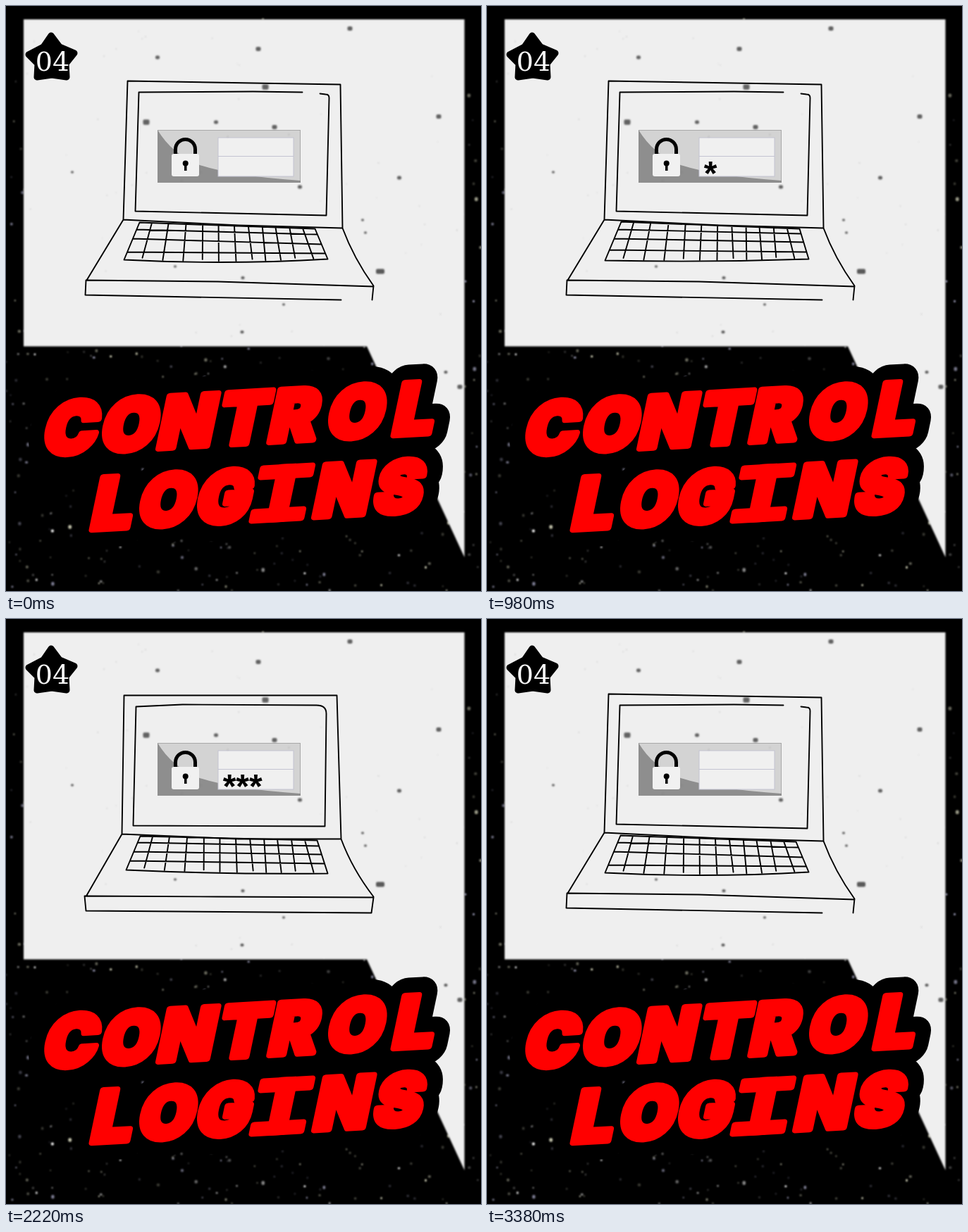
An HTML page that plays this animation: 674x831 px, repeating every 3.4 s.

```html
<!DOCTYPE html>
<html lang="en">
<head>
<meta charset="utf-8">
<title>Control logins</title>
<style>
  html, body { margin: 0; width: 100%; height: 100%; overflow: hidden; background: #000; }
  svg { display: block; }
  .ink path { fill: none; stroke: #000; stroke-width: 1.9; stroke-linecap: round; stroke-linejoin: round; }
  .soft { filter: blur(.8px); }
  #title { font: 900 102px Inter, sans-serif; text-anchor: middle; stroke-linejoin: round; }
</style>
</head>
<body>
<svg width="674" height="831" viewBox="0 0 674 831">
  <defs>
    <g id="title">
      <text transform="matrix(1 -.056 -.21 1 0 640.5)" x="87 170 251 331 403 491 574">CONTROL</text>
      <g transform="matrix(1 -.056 -.21 1 0 750.5)">
        <text x="146 223 304 384 472 552">LOGINS</text>
        <path d="M349 -74h70v12h-70zM349 -12h70v12h-70z"/>
      </g>
    </g>
  </defs>
  <rect width="674" height="831"/>
  <g id="stars" class="soft"></g>
  <path class="soft" fill="#efefef" d="M25 19H650.500V783L512 483.500H25Z"/>

  <path stroke="#000" stroke-width="9" stroke-linejoin="round"
    d="M64 42L76 58L97 67L85 82L86 101L65 98L44 101L45 82L32 69L53 58Z"/>
  <text x="66" y="92" font-family="DejaVu Serif, serif" font-size="38" text-anchor="middle" fill="#fff">04</text>

  <g class="ink" transform="translate(.5 .5)">
    <path id="laptop"/>
    <path id="keys"/>
  </g>

  <rect x="215.500" y="176.500" width="202" height="74" fill="#d3d3d3" stroke="#a8a8a8"/>
  <path fill="#8e8e8e" d="M215 176Q236 211 275 226Q325 242 418 248V251H215Z"/>
  <rect x="301" y="187" width="107" height="55" fill="#f0f0f0" stroke="#c3c3d2"/>
  <path d="M301 213.500H408" stroke="#c3c3d2"/>
  <path fill="none" stroke="#000" stroke-width="5" d="M240.500 210V203.500A14 14 0 0 1 268.500 203.500V210"/>
  <rect x="235" y="210" width="39" height="32" rx="3" fill="#f1f1f1"/>
  <path d="M253 223h3.500v11h-3.500z"/>
  <circle cx="254.700" cy="223.500" r="4"/>
  <text id="password" x="307.700" y="254" font-family="Liberation Sans, Arial, sans-serif" font-weight="700" font-size="48"></text>

  <g id="specks" class="soft" fill="#333"></g>
  <use href="#title" stroke="#000" stroke-width="52"/>
  <use href="#title" fill="#f00" stroke="#f00" stroke-width="9"/>
</svg>
<script>
const $ = id => document.getElementById(id);
const LOOP = 3400, RESET = 3340;
const TYPED_AT = [500, 1100, 1700, 2300];

let seed = 11;
const random = () => (seed = seed * 16807 % 2147483647) / 2147483647;
const mix = (a, b, k) => a + (b - a) * k;

function dot(parent, x, y, w, h, attrs = {}) {
  const el = document.createElementNS('http://www.w3.org/2000/svg', 'rect');
  const all = { x: x - w / 2, y: y - h / 2, width: w, height: h, rx: 2, ...attrs };
  for (const name in all) el.setAttribute(name, all[name]);
  parent.append(el);
}

for (let i = 0; i < 520; i++) {
  const size = 2 + 2.8 * random() ** 2;
  dot($('stars'), 674 * random(), 831 * random() ** .6, size, size * (.8 + .5 * random()), {
    fill: ['#fff', '#e4e4c8', '#b8b8d8'][i % 3],
    opacity: .25 + .7 * random() ** 2
  });
}

const specks = [
  [488, 32, 7], [215, 73, 6], [358, 61, 7], [368, 115, 9], [199, 165, 9], [298, 165, 6],
  [381, 172, 7], [614, 157, 7], [94, 236, 4], [558, 244, 6], [417, 257, 6], [506, 304, 4],
  [510, 322, 4], [336, 386, 5], [394, 424, 4], [335, 463, 5], [240, 370, 4], [644, 541, 7], [624, 520, 5]
];
for (const [x, y, size] of specks) dot($('specks'), x, y, size, size * .85, { opacity: .75 });
dot($('specks'), 531, 377, 12, 7, { opacity: .8 });
for (let i = 0; i < 45; i++) {
  dot($('specks'), mix(30, 645, random()), mix(24, 478, random()), 2, 2, { opacity: .06 + .12 * random() });
}

const laptops = [
  `M166 303L172 106L350 109L474 111L477 315L330 311ZL114 389
   M420 122L350 121L188 122L183 291L454 297L458 130Q458 125 453 125L445 124
   M477 315Q493 358 521 397L519 417
   M521 398L300 391L113 389L112 410L475 417`,
  `M164 305L167 108H469L475 312L330 312ZL114 392
   M184 124L250 121L440 122Q454 122 454 134L452 294L180 293Z
   M475 312Q491 355 521 394
   M521 395L300 394L111 393L113 414L518 417Z`
];

// Corners as [x, y], row ends as [left y, right y], sag of the lower edge.
const keyboards = [
  { tl: [189, 307], tr: [438, 316], bl: [167, 360], br: [456, 359], sag: 4, rows: [[317, 324], [330, 338], [349, 351]] },
  { tl: [190, 306], tr: [443, 316], bl: [167, 361], br: [456, 359], sag: 2, rows: [[317, 323], [330, 335], [346, 349]] },
  { tl: [190, 308], tr: [441, 314], bl: [170, 356], br: [456, 361], sag: 2, rows: [[317, 322], [330, 334], [343, 347]] },
  { tl: [187, 310], tr: [437, 314], bl: [166, 363], br: [456, 357], sag: 5, rows: [[319, 322], [334, 336], [352, 348]] }
];
const topStops = [.07, .165, .265, .36, .45, .54, .62, .7, .775, .855, .93];
const lowStops = [.09, .19, .29, .385, .465, .55, .63, .695, .77, .84, .93];

function keyboardPath({ tl, tr, bl, br, sag, rows }) {
  let d = `M${tl}L${tr}L${br}Q${(bl[0] + br[0]) / 2} ${(bl[1] + br[1]) / 2 + 2 * sag} ${bl}Z`;
  const edge = (a, b, y) => mix(a[0], b[0], (y - a[1]) / (b[1] - a[1]));
  for (const [left, right] of rows) {
    d += `M${edge(tl, bl, left)} ${left}L${edge(tr, br, right)} ${right}`;
  }
  topStops.forEach((k, i) => {
    const low = lowStops[i], bend = 4 * sag * low * (1 - low);
    d += `M${mix(tl[0], tr[0], k)} ${mix(tl[1], tr[1], k)}`
       + `L${mix(bl[0], br[0], low)} ${mix(bl[1], br[1], low) + bend - (i % 3 ? 2 : 4)}`;
  });
  return d;
}
const keyPaths = keyboards.map(keyboardPath);

function draw(now) {
  const t = now % LOOP;
  const typed = t < RESET ? TYPED_AT.filter(at => t >= at).length : 0;
  $('password').textContent = '*'.repeat(typed);
  $('laptop').setAttribute('d', laptops[typed < 2 ? 0 : 1]);
  $('keys').setAttribute('d', keyPaths[[0, 1, 2, 2, 3][typed]]);
  requestAnimationFrame(() => draw(performance.now()));
}
draw(0);
</script>
</body>
</html>
```
